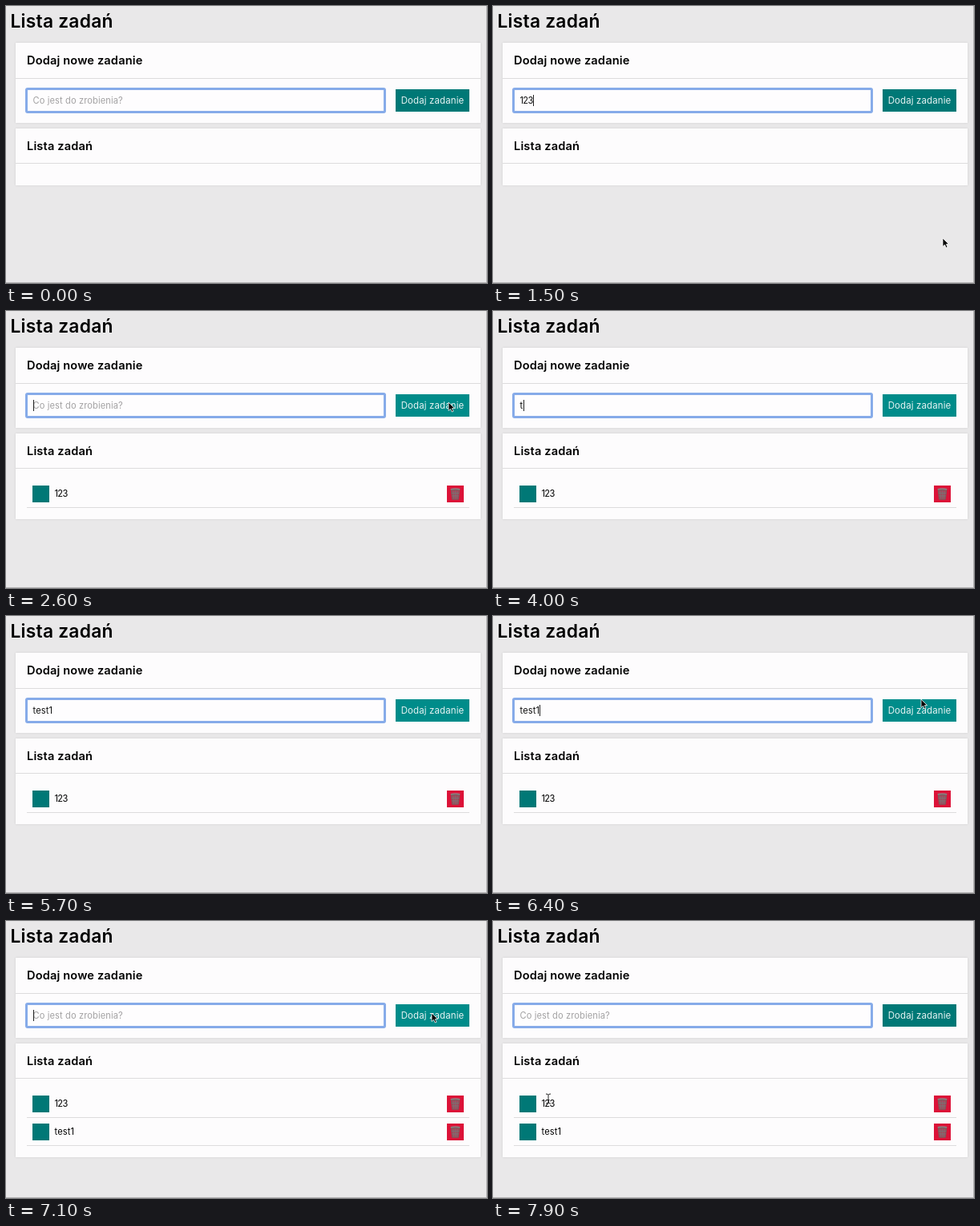
Animation of 600x346 px, one loop 8 s. Source, as an HTML page:

```html
<!DOCTYPE html>
<html lang="pl">
<head>
<meta charset="utf-8">
<title>Lista zadań</title>
<style>
  html, body { margin: 0; width: 100%; height: 100%; overflow: hidden; }
  #stage {
    position: relative; width: 600px; height: 346px; overflow: hidden;
    background: #e9e8e9; color: #000; letter-spacing: .01em;
    font: 11.1px Inter, "Open Sans", sans-serif;
  }
  #stage * { position: absolute; box-sizing: border-box; white-space: pre; }
  h1, h2 { margin: 0; font-weight: 600; line-height: 20px; letter-spacing: .01em; }
  h1 { left: 5.5px; top: 9px; font-size: 22.8px; }
  h2 { left: 14px; top: 12px; font-size: 14.6px; }
  .card {
    left: 12px; width: 580px; background: #fdfcfd;
    box-shadow: 0 0 3px rgba(0, 0, 0, .1);
  }
  .rule { left: 0; width: 580px; top: 43px; height: 1px; background: #dddcdd; }
  #field {
    left: 24px; top: 102px; width: 450px; height: 32px;
    background: #fefdfe; border: 3px solid #86abe9; border-radius: 3px;
  }
  #value { left: 33.5px; top: 110px; line-height: 16px; }
  #caret { left: 34px; top: 111px; width: 1px; height: 14px; background: #222; }
  #add {
    left: 486px; top: 104px; width: 92px; height: 28px; line-height: 28px;
    color: #e6f2f2; font-size: 11.5px; text-align: center;
  }
  .item { left: 14px; width: 552px; height: 35px; border-bottom: 1px solid #dddcdd; }
  .done { left: 7px; top: 7px; width: 21px; height: 21px; background: #007876; }
  .name { left: 34.5px; top: 9px; line-height: 16px; }
  .digits { letter-spacing: -.06em; }
  .bin { left: 524px; top: 7px; width: 21px; height: 21px; background: #dc1238; }
  .edge { background: #b4b3b4; }
  #pointer { left: 0; top: 0; width: 20px; height: 20px; overflow: visible; }
</style>
</head>
<body>
<div id="stage">
  <h1>Lista zadań</h1>
  <div class="card" style="top:46px;height:100px">
    <h2>Dodaj nowe zadanie</h2><div class="rule" style="top:44px"></div>
  </div>
  <div id="field"></div>
  <div id="value"></div>
  <div id="caret"></div>
  <div id="add">Dodaj zadanie</div>
  <div class="card" id="list" style="top:153px">
    <h2>Lista zadań</h2><div class="rule"></div>
  </div>
  <div class="edge" style="left:599px;top:0;width:1px;height:346px"></div>
  <div class="edge" style="left:0;top:345px;width:600px;height:1px"></div>
  <svg id="pointer">
    <path id="arrow" d="M0 0V10.5L2.5 8.3L4.2 12L6 11.2L4.4 7.6H7.6Z"
      fill="#000" stroke="#fff" stroke-width=".8"/>
    <path id="beam" d="M-3 -6Q0 -6 0 -4.5Q0 -6 3 -6M0 -4.5V5M-3 6Q0 6 0 4.5Q0 6 3 6M-1.5 1.5H1.5"
      fill="none" stroke="#222" stroke-width="1"/>
  </svg>
</div>
<script>
  const LOOP = 8000, STEP = 100;
  const $ = id => document.getElementById(id);

  // time, typed text, caret x
  const typing = [
    [0, "", 34], [600, "1", 38], [800, "12", 44], [1000, "123", 50],
    [2500, "", 34], [4000, "t", 38], [4300, "te", 45], [4600, "tes", 51],
    [4900, "test", 55], [5200, "test1", 58], [6900, "", 34]
  ];
  const caretOff = [[0, 100], [1600, 2100], [3100, 3600], [5700, 6200], [6700, 6900], [7400, 8000]];
  const added = [[2500, "123"], [6900, "test1"]];

  // each stretch of visible pointer: time, x, y
  const moves = [
    [[1100, 583, 272], [1300, 572, 288], [1500, 561, 290], [1650, 560, 240],
     [1800, 556, 149], [1900, 554, 128], [2200, 552, 114], [4000, 552, 114]],
    [[5900, 551, 108], [6100, 543, 62], [6200, 540, 60], [6400, 534, 104],
     [6700, 531, 115], [7400, 531, 115], [7600, 440, 148], [7700, 270, 190],
     [7800, 90, 226], [7900, 69, 222], [8000, 69, 222]]
  ];

  const items = added.map(([, text], i) => {
    const item = document.createElement("div");
    item.className = "item";
    item.style.top = 58 + i * 35 + "px";
    item.innerHTML = `<div class="done"></div><div class="name">${text}</div>
      <svg class="bin" viewBox="0 0 21 21">
        <path d="M5.3 5.5H15.7L14.3 17.2H6.7Z" fill="#a3475a" stroke="#73615f" stroke-width="1"/>
        <path d="M8 6.5L8.6 16.5M10.5 6.5V16.5M13 6.5L12.4 16.5M6 9.5H15M6.3 13H14.7"
          stroke="#777" stroke-width=".8"/>
        <path d="M4.7 4.8Q10.5 3 16.3 4.8" fill="none" stroke="#8b8586" stroke-width="1.5"/>
      </svg>`;
    $("list").append(item);
    return item;
  });
  const setDigits = (el, text) => el.classList.toggle("digits", /^\d+$/.test(text));
  items.forEach((item, i) => setDigits(item.querySelector(".name"), added[i][1]));

  const lastBefore = (rows, t) => rows.filter(row => row[0] <= t).pop();

  function along(path, t) {
    const i = path.findIndex(p => p[0] > t);
    if (i < 0) return path[path.length - 1].slice(1);
    const [t0, x0, y0] = path[i - 1], [t1, x1, y1] = path[i];
    const k = (t - t0) / (t1 - t0);
    return [x0 + (x1 - x0) * k, y0 + (y1 - y0) * k];
  }

  const inside = (x, y, l, t, r, b) => x >= l && x <= r && y >= t && y <= b;

  function draw(t) {
    const [, text, caretX] = lastBefore(typing, t);
    const value = $("value");
    value.textContent = text || "Co jest do zrobienia?";
    value.style.color = text ? "#111" : "#a3a2a3";
    setDigits(value, text);
    $("caret").style.left = caretX + "px";
    $("caret").hidden = caretOff.some(([a, b]) => t >= a && t < b);

    let count = 0;
    added.forEach(([at], i) => {
      items[i].hidden = t < at;
      if (t >= at) count++;
    });
    $("list").style.height = (count ? 72 + count * 35 : 71) + "px";

    // hover persists while typing hides the pointer
    const path = moves.filter(p => p[0][0] <= t).pop();
    const shown = path && t < path[path.length - 1][0];
    const [x, y] = path ? along(path, t) : [0, 0];
    $("add").style.background = inside(x, y, 486, 103, 578, 132) ? "#008c8a" : "#007876";
    const onText = inside(x, y, 26, 104, 472, 132) || inside(x, y, 60, 216, 80, 238);
    $("pointer").style.display = shown ? "block" : "none";
    $("pointer").style.transform = `translate(${x}px, ${y}px)`;
    $("arrow").style.display = onText ? "none" : "inline";
    $("beam").style.display = onText ? "inline" : "none";
  }

  let start;
  function tick(now) {
    start ??= now;
    draw(Math.floor(((now - start) % LOOP) / STEP) * STEP);
    requestAnimationFrame(tick);
  }
  draw(0);
  requestAnimationFrame(tick);
</script>
</body>
</html>
```
